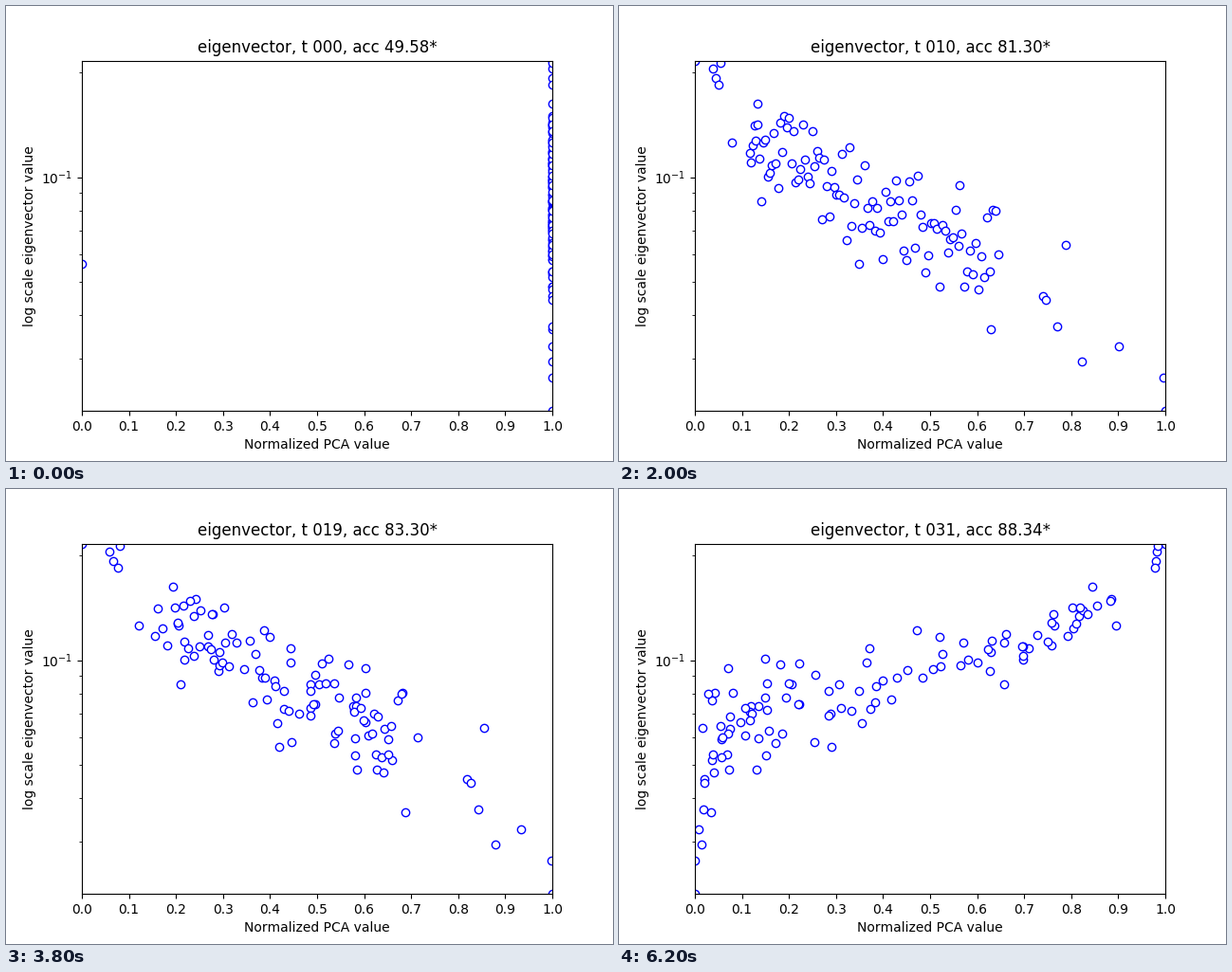
These frames come from a looping animation (640x480 px, 6.4 s). A matplotlib script:

```python
import numpy as np
import matplotlib.pyplot as plt
from matplotlib.animation import FuncAnimation
from matplotlib.ticker import LogLocator, NullFormatter

plt.rcParams["text.kerning_factor"] = 6

STEPS, INTERVAL = 32, 200
LEFT, RIGHT, TOP, BOTTOM = 80, 576, 57.6, 427.2   # axes box in stage pixels
FLIP_STEP = 21                                    # PCA sign reverses here
BODY = 101                                        # nodes in the main cloud

rng = np.random.default_rng(7)


def eigen_value(py):
    """Stage height to value on the log axis."""
    return 10 ** (-1 + (180.5 - py) / 366)


# Step 10: a cloud sloping down between a few hubs and leaves
body_x = 138 + 262 * np.linspace(0, 1, BODY) ** 1.15
body_y = 160 + 0.45 * (body_x - 150) + np.clip(rng.normal(0, 34, BODY), -55, 65)
hubs = [(80, TOP), (99, 66), (102, 76), (105, 83), (107, 60), (119, 144),
        (146, 103)]
leaves = [(359, 189), (392, 341), (447, 306), (450, 310), (462, 338),
          (471, 252), (488, 375), (527, 359), (574, 392), (RIGHT, BOTTOM)]
ends = np.array(hubs + leaves)
spread = np.append(body_x, ends[:, 0])
heights = np.append(body_y, ends[:, 1])
count = len(spread)

inner = (spread > 125) & (spread < 420)
lean_weight = np.exp(-((spread - 190) / 50) ** 2)


def bent(curve, lean, noise):
    """Bend the step 10 positions, leaning them by height."""
    x = np.interp(spread, [80, 107, 150, 230, 300, 380, 450, 576], curve)
    x += lean * lean_weight * (heights - 190)
    x += inner * rng.normal(0, noise, count)
    return np.clip(x, LEFT, RIGHT)


poses = {
    10: spread,
    14: bent([80, 114, 172, 230, 318, 352, 426, 576], 0, 8),
    19: bent([80, 122, 190, 270, 344, 402, 490, 576], 0.2, 8),
    23: bent([80, 110, 218, 312, 408, 476, 530, 576], 0.5, 8),
    31: bent([80, 105, 246, 346, 488, 556, 566, 576], 2, 7),
}

# Early steps: tight clusters that loosen until step 4
cluster = np.searchsorted([81, 125, 200, 308, 465, 570], spread)
centre = np.array([80, 84, 130, 204, 325, 546, 576])[cluster]
jitter = np.array([0, 5, 9, 12, 9, 6, 0])[cluster] * rng.normal(size=count)
poses[4] = np.clip(centre + jitter, LEFT, RIGHT)

start = np.full(count, RIGHT)
start[np.argmin(abs(heights - 270))] = LEFT

key_steps = sorted(poses)


def positions(step):
    if step == 0:
        return start
    if step <= 4:
        return np.clip(centre + jitter * step / 4, LEFT, RIGHT)
    after = next(k for k in key_steps if k >= step)
    before = key_steps[key_steps.index(after) - 1]
    mix = (step - before) / (after - before)
    x = poses[before] * (1 - mix) + poses[after] * mix
    return LEFT + RIGHT - x if step >= FLIP_STEP else x


accuracy = np.interp(np.arange(STEPS), [0, 3, 4, 10, 14, 19, 23, 31],
                     [49.58, 49.58, 50.42, 81.30, 76.82, 83.30, 84.70, 88.34])


def heading(step):
    best = step == 0 or accuracy[step] > accuracy[:step].max()
    star = "*" if best else ""
    return f"eigenvector, t {step:03d}, acc {accuracy[step]:.2f}{star}"


fig, ax = plt.subplots(figsize=(6.4, 4.8), dpi=100)
ax.set_yscale("log")
ax.set_xlim(0, 1)
ax.set_ylim(eigen_value(BOTTOM), eigen_value(TOP))
ax.set_xticks(np.arange(11) / 10)
ax.yaxis.set_minor_locator(LogLocator(subs=range(2, 10)))
ax.yaxis.set_minor_formatter(NullFormatter())
ax.set_xlabel("Normalized PCA value")
ax.set_ylabel("log scale eigenvector value")
title = ax.set_title("")
dots, = ax.plot([], [], "o", mec="blue", mfc="white")


def update(step):
    x = (positions(step) - LEFT) / (RIGHT - LEFT)
    dots.set_data(x, eigen_value(heights))
    title.set_text(heading(step))
    return dots, title


anim = FuncAnimation(fig, update, frames=STEPS, interval=INTERVAL, repeat=True)
plt.show()
```
